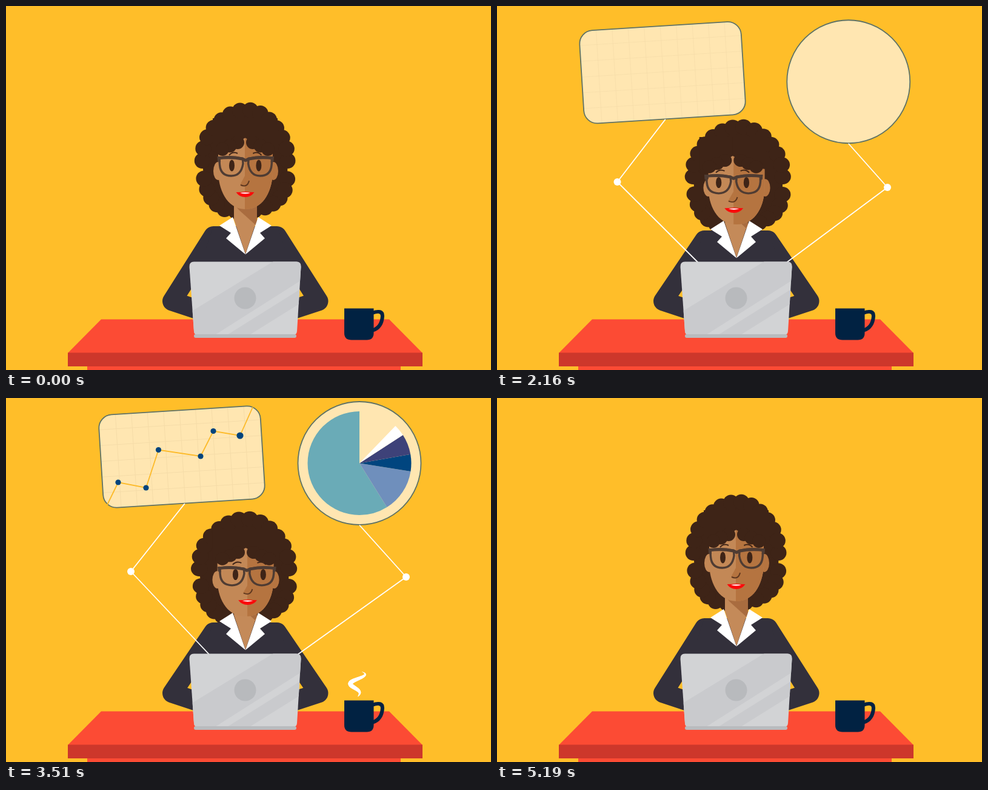
Animation of 800 by 600 pixels, one loop 5.22 s. Source, as an HTML page with a canvas:

```html
<!DOCTYPE html>
<html lang="en">
<head>
<meta charset="utf-8">
<title>Desk analytics</title>
<style>
html, body { margin: 0; width: 100%; height: 100%; overflow: hidden; background: #ffbe29; }
canvas { display: block; width: 800px; height: 600px; }
</style>
</head>
<body>
<canvas id="stage" width="800" height="600"></canvas>
<script>
const ctx = document.getElementById('stage').getContext('2d');
const LOOP = 5220, STEP = 30, TAU = Math.PI * 2;
const JACKET = '#33303b', HAIR = '#3e2417', SKIN = '#c38856', SHADE = '#b57440';
const CREAM = '#ffe6b1', RIM = '#5f7264', RED = '#fc4b34', NAVY = '#00447d';
const HUB = [394, 485];

// ---- timing ----
const ramp = (t, a, b) => Math.min(1, Math.max(0, (t - a) / (b - a)));
const smooth = u => u * u * (3 - 2 * u);
const ease = (t, a, b) => smooth(ramp(t, a, b));
const outCubic = u => 1 - (1 - u) ** 3;
const bump = (t, mid, half) => Math.cos(Math.PI / 2 * Math.min(1, Math.abs(t - mid) / half)) ** 2;
const mix = (a, b, k) => [a[0] + (b[0] - a[0]) * k, a[1] + (b[1] - a[1]) * k];

// Floating parts glide from one resting place to the next on shared beats
const BEATS = [1650, 2670, 3510, 4200];
const drift = (t, places) =>
  places.reduce((p, next, i) => mix(p, next, i ? ease(t, BEATS[i - 1], BEATS[i]) : 0));

// Clock of the charts: plays forward, holds, then rewinds quickly
const chartTime = t => t < 4100 ? Math.min(t, 3550) : 3550 - 3.96 * (t - 4100);

// ---- drawing helpers ----
function trace(pts, close) {
  ctx.beginPath();
  pts.forEach(p => ctx.lineTo(p[0], p[1]));
  if (close) ctx.closePath();
}
function poly(color, pts) {
  trace(pts, true);
  ctx.fillStyle = color;
  ctx.fill();
}
function line(color, width, pts) {
  trace(pts);
  ctx.strokeStyle = color;
  ctx.lineWidth = width;
  ctx.stroke();
}
function oval(color, x, y, rx, ry = rx) {
  ctx.beginPath();
  ctx.ellipse(x, y, rx, ry, 0, 0, TAU);
  ctx.fillStyle = color;
  ctx.fill();
}
function fillPath(color, d) {
  ctx.fillStyle = color;
  ctx.fill(new Path2D(d));
}
function strokePath(color, width, d) {
  ctx.strokeStyle = color;
  ctx.lineWidth = width;
  ctx.stroke(new Path2D(d));
}
function group(draw) {
  ctx.save();
  draw();
  ctx.restore();
}
const shift = (dx, dy, draw) => group(() => { ctx.translate(dx, dy); draw(); });
// Draws once and once more mirrored about the vertical axis x
function both(x, draw) {
  draw();
  group(() => { ctx.translate(2 * x, 0); ctx.scale(-1, 1); draw(); });
}
function scaled(x, y, dx, dy, sx, sy, draw) {
  group(() => {
    ctx.translate(x + dx, y + dy);
    ctx.scale(sx, sy);
    ctx.translate(-x, -y);
    draw();
  });
}

// ---- charts ----
const CARD = [[266, 103], [280, 116.5], [290, 97], [296.5, 96]];
const DISC = [[587, 124], [572.5, 125.5], [583, 107.5], [586.5, 107.5]];
const GRAPH = [[-123, 79], [-105, 42], [-59, 51], [-38.5, -11.5], [31, -1], [52, -42.5], [96, -35], [117, -82]];
const SLICES = [['#6f8fbc', 49], ['#00457f', 19], ['#3e4279', 23], ['#ffffff', 13]];
const TILT = -3.6 * Math.PI / 180;
const grow = t => ease(t, 1300, 1660);
const swell = t => ease(t, 1650, 1950);

function rim(length, k) {
  if (k <= 0) return;
  ctx.setLineDash([length * k + 0.5, length * 2]);
  ctx.strokeStyle = RIM;
  ctx.lineWidth = 1.8;
  ctx.stroke();
  ctx.setLineDash([]);
}
function cardPath(hw, hh, r) {
  ctx.beginPath();
  ctx.moveTo(hw - r, -hh);
  ctx.arcTo(hw, -hh, hw, hh, r);
  ctx.arcTo(hw, hh, -hw, hh, r);
  ctx.arcTo(-hw, hh, -hw, -hh, r);
  ctx.arcTo(-hw, -hh, hw, -hh, r);
  ctx.closePath();
}
function lineCard([x, y], t) {
  const s = grow(t), e = 22 * swell(t);
  if (s <= 0) return;
  shift(x, y, () => {
    group(() => {
      ctx.rotate(TILT);
      cardPath(111.5 * s + e, 54.7 * s + e, e);
      ctx.fillStyle = CREAM;
      ctx.fill();
      group(() => {
        ctx.clip();
        ctx.globalAlpha = ramp(t, 2000, 2250);
        for (let gx = -105; gx < 133; gx += 26.5) line('#f5dca8', 1, [[gx, -77], [gx, 77]]);
        for (let gy = -53; gy < 77; gy += 26) line('#f5dca8', 1, [[-134, gy], [134, gy]]);
      });
      cardPath(133.5, 76.7, 22);
      rim(803, ramp(t, 1640, 2150));
    });
    graph(t - 2200);
  });
}
function graph(t) {
  if (t <= 0) return;
  const speed = 0.329;
  ctx.setLineDash([t * speed, 999]);
  line('#fdba28', 1.8, GRAPH);
  ctx.setLineDash([]);
  let dist = 0;
  for (let i = 1; i < GRAPH.length - 1; i++) {
    const [x, y] = GRAPH[i];
    dist += Math.hypot(x - GRAPH[i - 1][0], y - GRAPH[i - 1][1]);
    const age = t - dist / speed;
    if (age >= 0) oval(NAVY, x, y, Math.max(1, 4.6 * ease(age, 0, 280) + bump(age, 345, 140)));
  }
}
function pieDisc([x, y], t) {
  const r = 65 * grow(t) + 37 * swell(t);
  if (r <= 0) return;
  oval(CREAM, x, y, r);
  ctx.beginPath();
  ctx.arc(x, y, 101.5, -TAU / 4, TAU * 3 / 4);
  rim(101.5 * TAU, ramp(t, 1680, 2150));

  let angle = 20 * (1 - ramp(t, 2250, 2950)) - 90;
  const slice = (color, size) => {
    if (size <= 0) return;
    ctx.beginPath();
    ctx.moveTo(x, y);
    ctx.arc(x, y, 85.5, angle * TAU / 360, (angle - size) * TAU / 360, true);
    ctx.fillStyle = color;
    ctx.fill();
    angle -= size;
  };
  slice('#6aabb7', 212 * ramp(t, 2250, 2755));
  let rest = 104 * ramp(t, 2655, 3150);
  for (const [color, size] of SLICES) {
    slice(color, Math.min(size, rest));
    rest -= size;
  }
}

// ---- connectors ----
const LEFT = { bend: [156, 482], reach: [240, 197], dots: [[195, 289], [202, 291], [206, 286], [207, 282]] };
const RIGHT = { bend: [679, 443], reach: [608, 224], dots: [[645, 299], [643, 299], [660, 295], [657, 305]] };

function connector(t, { bend, reach, dots }, anchor) {
  const rest = drift(t, dots);
  const fly = outCubic(Math.min(ramp(t, 580, 1350), 1 - ramp(t, 4450, 4850)));
  const dot = mix(mix(HUB, bend, fly), mix(bend, rest, fly), fly);
  const lower = ease(t, 820, 1100) - ease(t, 4350, 4560);
  if (lower > 0) line('#fff', 1.8, [HUB, mix(HUB, dot, lower)]);
  const goal = mix(reach, anchor, ease(t, 1650, 1950));
  const upper = ramp(t, 1200, 1650) - ease(t, 4050, 4370);
  if (upper > 0) line('#fff', 1.8, [dot, mix(dot, goal, upper)]);
  oval('#fff', dot[0], dot[1], 6);
}

// ---- steam: a tapered wave that rises and lets go of the cup ----
function steam(t, start, side, tall, width) {
  const from = ramp(t, start + 380, start + 830), to = ramp(t, start, start + 400);
  if (to <= from) return;
  const point = u => [578 + side * (4 + 13 * u) * Math.sin(TAU * (u - 0.275) / 0.7), 492 - tall * u];
  const count = 40;
  ctx.lineCap = 'round';
  for (let i = 0; i < count; i++) {
    const u = from + (to - from) * i / count, v = u + (to - from) / count;
    line('#fff', 0.6 + width * Math.sin(Math.PI * (i + 0.5) / count), [point(u), point(v)]);
  }
  ctx.lineCap = 'butt';
}

// ---- woman ----
// Curls sit on an oval that is squarer in its lower half
const CURLS = Array.from({ length: 26 }, (_, i) => {
  const a = TAU * i / 26, c = Math.cos(a), s = Math.sin(a), p = s > 0 ? 2 / 2.8 : 1;
  const wobble = 1 + 0.018 * Math.sin(i * 7.3);
  return [394.5 + 70 * wobble * Math.sign(c) * Math.abs(c) ** p,
    255 + 82.5 * wobble * Math.sign(s) * Math.abs(s) ** p];
});

function arm(...joints) {
  ctx.lineCap = ctx.lineJoin = 'round';
  line(JACKET, 32, joints);
  ctx.lineCap = 'butt';
  ctx.lineJoin = 'miter';
}
function body(t, lean) {
  const type = -1.2 * (1 - ramp(t, 0, 1050)) * Math.sin(TAU * t / 240);
  const swing = 13 * bump(t, 270, 250) + 21 * bump(t, 4200, 270);
  const top = 379 + 7 * lean, shoulder = top + 4 * type, elbow = 486.5 + 4 * type, hand = 505 + 8 * type;
  arm([342, shoulder], [274, elbow], [330, hand]);
  arm([447, shoulder], [515.5 + swing, elbow - 0.7 * swing], [459 + 0.7 * swing, hand - 0.9 * swing]);
  poly(JACKET, [[342, top - 16], [447, top - 16], [460, top + 20], [460, 520], [330, 520], [330, top + 20]]);
}
function collar(lean) {
  shift(0, 6 * lean, () => {
    poly('#c48a59', [[376, 322], [414, 322], [414, 352], [395, 409], [376, 352]]);
    poly('#a96c3f', [[376, 326], [414, 326], [414, 363], [384, 336]]);
    both(395, () => poly('#fff', [[374, 348], [352, 362], [371, 374], [363, 383], [395, 409.5]]));
  });
}
function backHair(lean, look) {
  scaled(394.5, 262, Math.abs(look) - 2.5 * look, 26 * lean, 1 + 0.05 * lean, 1 - 0.02 * lean, () => {
    poly(HAIR, CURLS);
    CURLS.forEach(([x, y]) => oval(HAIR, x, y, 13));
  });
}
function face(t, lean, look) {
  const side = Math.abs(look);
  scaled(395, 263, 0, 28 * lean, 1 + 0.03 * lean, 1 - 0.04 * lean, () => {
    oval(SKIN, 350, 272, 8, 15);
    oval(SHADE, 441, 272, 8, 15);
    const shape = 'M350 215H440V272C440 300 427 335 395 335C363 335 350 300 350 272Z';
    fillPath(SKIN, shape);
    group(() => {
      ctx.clip(new Path2D(shape));
      ctx.fillStyle = SHADE;
      ctx.fillRect(394 + 4 * look, 200, 60, 140);
    });
    shift(3.5 * look - 2.5 * side, 0, () => both(394.5, fringe));
    shift(6.5 * look, 0, () => both(394.7, () => {
      oval(HAIR, 372.5, 263, 4.5, 9.5);
      strokePath(HAIR, 2, 'M368 246Q374 239 382 243');
    }));
    shift(5 * look, 0, () => {
      fillPath(SHADE, 'M395 278L386 295Q392 298 396 297Z');
      strokePath('#5f3820', 2, 'M387 295Q398 300 401 288');
    });
    shift(4 * look, 0, () => {
      fillPath('#fa0a0a', 'M379.5 307Q388 307 394.5 306Q401 307 409.5 307Q404 315 394.5 315Q385 315 379.5 307Z');
      fillPath('#fff', 'M386 308Q394.5 306.5 403 308Q394.5 311 386 308Z');
    });
    shift(3.7 * look - 1.7 * side, 1.5 * lean + 9.5 * bump(t, 4200, 300), () => both(395.3, lens));
  });
}
function fringe() {
  poly(HAIR, [[341, 240], [357, 238], [383, 224], [395, 217], [395, 185], [341, 185]]);
  for (let i = 0; i < 3; i++) oval(HAIR, 382 - 12.5 * i, 225 + 5.5 * i, 11);
}
function lens() {
  const frame = '#4f3c33';
  strokePath(frame, 3.4, 'M351.5 250.5Q371 246.5 390.5 251.5L391 260Q388 280 371.5 280Q354 280 352.5 262Z');
  strokePath(frame, 5, 'M349 251Q370 248 390 252L396 255');
  fillPath(frame, 'M348.5 248H354V258L349 256Z');
}

// ---- furniture ----
function desk() {
  poly(RED, [[157, 516.5], [632, 516.5], [687, 572], [102, 572]]);
  ctx.fillStyle = '#cd372b';
  ctx.fillRect(102, 571.5, 585, 22.5);
  ctx.fillStyle = RED;
  ctx.fillRect(134, 594, 517, 6);
}
function laptop() {
  const lid = 'M310 421.5H479Q487 421.5 486.5 430L480 536Q479.5 542 474 542H316Q310.5 542 310 536L302.5 430Q302 421.5 310 421.5Z';
  fillPath('#d2d3d5', lid);
  group(() => {
    ctx.clip(new Path2D(lid));
    poly('#c9cacd', [[300, 507], [441, 421], [490, 421], [490, 450], [345, 542], [300, 542]]);
    poly('#c9cacd', [[365, 542], [490, 464], [490, 487], [402, 542]]);
  });
  oval('#b8babd', 394.5, 481.5, 18);
  ctx.beginPath();
  ctx.roundRect(310, 541, 169, 6, 3);
  ctx.fillStyle = '#b9bbbe';
  ctx.fill();
}
function mug() {
  strokePath('#012242', 6, 'M604 506Q621 500 621 511Q620 530 604 535');
  fillPath('#012242', 'M558 498.5H606.5V539Q606.5 550.5 595 550.5H570Q558 550.5 558 539Z');
}

function draw(t) {
  ctx.fillStyle = '#ffbe29';
  ctx.fillRect(0, 0, 800, 600);
  const card = drift(t, CARD), disc = drift(t, DISC), clock = chartTime(t);
  const lean = ease(t, 1150, 2100) - ease(t, 3850, 4400);
  const look = 2 * ease(t, 2850, 3300) - ease(t, 1750, 2250) - ease(t, 3850, 4250);
  lineCard(card, clock);
  pieDisc(disc, clock);
  desk();
  backHair(lean, look);
  body(t, lean);
  collar(lean);
  face(t, lean, look);
  connector(t, LEFT, [card[0] + 4.8, card[1] + 77]);
  connector(t, RIGHT, [disc[0], disc[1] + 102]);
  laptop();
  steam(t, 1250, 1, 72, 5.5);
  steam(t, 3150, -1, 45, 6.5);
  steam(t, 3700, 1, 84, 5);
  mug();
}
function tick() {
  draw(Math.floor(performance.now() % LOOP / STEP) * STEP);
  requestAnimationFrame(tick);
}
tick();
</script>
</body>
</html>
```
